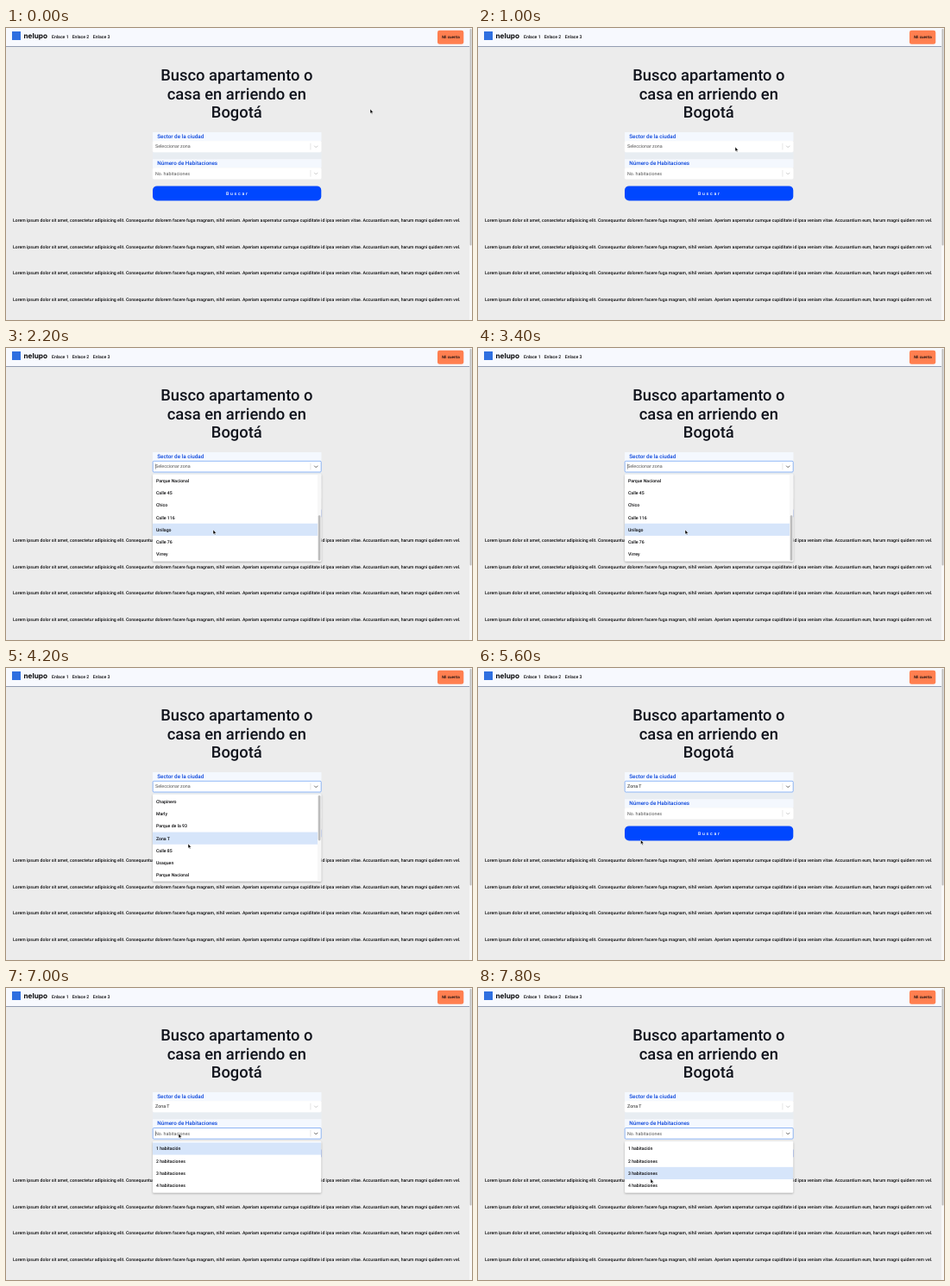
Animation of 540x339 px, one loop 8000 ms. Source, as an HTML page:

```html
<!DOCTYPE html>
<html lang="es">
<head>
<meta charset="utf-8">
<style>
  html, body { margin: 0; width: 100%; height: 100%; overflow: hidden; background: #ececec; }
  svg { display: block; width: 100vw; height: 100vh; }
  text { font-family: Roboto, "Open Sans", sans-serif; font-size: 5.17px; font-weight: 500; fill: #0a0a0c; text-rendering: geometricPrecision; }
  .brand { font: 700 8.2px Inter, sans-serif; }
  .title { font-size: 18.35px; fill: #10131c; text-anchor: middle; }
  .label { font-size: 6.32px; fill: #0b46dc; }
  .field { font-size: 5.35px; font-weight: 400; }
  .search { fill: #fff; letter-spacing: 1.75px; }
  .account { font-size: 4.6px; }
  .menu { filter: drop-shadow(0 1px 1.2px #0004); }
</style>
</head>
<body>
<svg id="stage" viewBox="0 0 540 339"></svg>
<script>
const LOOP = 8000, STEP = 200, ROW = 14.22, BLINK = 1060;
const stage = document.getElementById('stage');

function add(parent, tag, attrs = {}, content = '') {
  const node = document.createElementNS('http://www.w3.org/2000/svg', tag);
  for (const key in attrs) node.setAttribute(key, attrs[key]);
  node.textContent = content;
  return parent.appendChild(node);
}
const rect = (parent, x, y, width, height, fill, more) =>
  add(parent, 'rect', { x, y, width, height, fill, ...more });
const text = (parent, x, y, content, cls = '') => add(parent, 'text', { x, y, class: cls }, content);
const show = (node, on) => node.setAttribute('visibility', on ? 'inherit' : 'hidden');

function drawPage() {
  rect(stage, 0, 0, 540, 339, '#ececec');
  rect(stage, 0, 0, 537, 21, '#f7f9fe');
  rect(stage, 0, 21, 537, 1, '#939db2');
  rect(stage, 7, 4, 10, 10, '#2f6fe0');
  text(stage, 20.5, 12.2, 'nelupo', 'brand');
  [53, 76.7, 100.8].forEach((x, i) => text(stage, x, 12.3, `Enlace ${i + 1}`));
  rect(stage, 500, 2.8, 30.3, 16, '#ff7f50', { rx: 2.4 });
  text(stage, 505.3, 12.2, 'Mi cuenta', 'account');

  ['Busco apartamento o', 'casa en arriendo en', 'Bogotá'].forEach((line, i) =>
    text(stage, 267.3, 61.3 + 21.4 * i, line, 'title'));

  const lorem = 'Lorem ipsum dolor sit amet, consectetur adipisicing elit. Consequuntur dolorem facere fuga magnam, nihil veniam. ' +
    'Aperiam aspernatur cumque cupiditate id ipsa veniam vitae. Accusantium eum, harum magni quidem rem vel.';
  for (let i = 0; i < 4; i++) text(stage, 8, 225 + 30.55 * i, lorem);

  rect(stage, 170, 144, 195.5, 8, '#e8edf2');
  rect(stage, 170, 183.4, 195.3, 17, '#0047ff', { rx: 5 });
  text(stage, 255, 193.7, 'Buscar', 'search');

  rect(stage, 537, 0, 3, 339, '#f8f8f8');
  rect(stage, 537.5, 1, 2, 251.5, '#bdbdbd', { rx: 1 });
}

function makeSelect(top, label, placeholder) {
  rect(stage, 170, top, 195.5, 10, '#f4f8fe');
  text(stage, 175.2, top + 7.1, label, 'label');
  const y = top + 10;
  const box = rect(stage, 170.2, y + 0.3, 195, 12.7, '#fff', { rx: 1.2, 'stroke-width': 0.6 });
  const value = text(stage, 173, y + 8.3, placeholder, 'field');
  rect(stage, 352.7, y + 2.7, 0.5, 7.8, '#ccc');
  const chevron = add(stage, 'path', { d: `M357.2 ${y + 5.7}l2 2l2-2`, fill: 'none', 'stroke-width': 0.9 });
  const caret = rect(stage, 173, y + 3.5, 0.5, 6.2, '#555');
  return { set(focused, caretOn, chosen) {
    box.setAttribute('stroke', focused ? '#4a8cf5' : '#fff');
    chevron.setAttribute('stroke', focused ? '#555' : '#c4c4c4');
    value.textContent = chosen || placeholder;
    value.style.fill = chosen ? '#222' : '#555';
    caret.setAttribute('x', chosen ? 189.5 : 173);
    show(caret, focused && caretOn);
  } };
}

function makeMenu(top, height, options) {
  const scrolls = options.length * ROW > height;
  const width = scrolls ? 191 : 195.3, first = top + 1.4;
  const maxScroll = options.length * ROW + 2.8 - height;
  const id = `clip${top}`;
  rect(add(stage, 'clipPath', { id }), 170, top, 195.3, height);
  const group = add(stage, 'g', { class: 'menu' });
  rect(group, 170, top, 195.3, height, '#fff', { rx: 1.2 });
  const view = add(group, 'g', { 'clip-path': `url(#${id})` });
  const list = add(view, 'g');
  const hover = rect(list, 170, first, width, ROW, '#d6e5fa');
  options.forEach((name, i) => text(list, 174, first + ROW * i + 9, name));
  if (scrolls) rect(group, 361, top, 4.3, height, '#f7f7f7');
  const thumb = scrolls && rect(group, 361.8, first, 2.6, 52.5, '#bcbcbc', { rx: 1.3 });
  return { set(open, pointerY, amount = 0) {
    show(group, open);
    const scroll = amount * maxScroll;
    const row = Math.floor((pointerY + scroll - first) / ROW);
    hover.setAttribute('y', first + ROW * Math.max(0, Math.min(options.length - 1, row)));
    list.setAttribute('transform', `translate(0 ${-scroll})`);
    if (thumb) thumb.setAttribute('y', first + amount * (height - 55));
  } };
}

// Rows of [time, ...values], linear in between
const pointerPath = [
  [0, 422, 94], [200, 418, 95.5], [1000, 298, 138], [1400, 298, 138], [1800, 244, 205], [2200, 240, 211],
  [3600, 240, 211], [4000, 211, 204], [5000, 211, 204], [5800, 181, 198], [6200, 181, 198],
  [6800, 200, 169], [7200, 200, 169], [7800, 200, 221.5], [LOOP, 200, 221.5]
];
const scrollPath = [[0, 0], [1600, 0], [2200, 1], [3600, 1], [4000, 0], [LOOP, 0]];

function sample(path, t) {
  const i = path.findIndex((row, k) => k > 0 && t <= row[0]);
  const [a, b] = [path[i - 1], path[i]];
  const p = (t - a[0]) / (b[0] - a[0]);
  return a.slice(1).map((v, k) => v + (b[k + 1] - v) * p);
}

drawPage();
const zone = makeSelect(121, 'Sector de la ciudad', 'Seleccionar zona');
const rooms = makeSelect(152.2, 'Número de Habitaciones', 'No. habitaciones');
const zoneMenu = makeMenu(146.5, 101.3, ['Chapinero', 'Marly', 'Parque de la 93', 'Zona T', 'Calle 85', 'Usaquen',
  'Parque Nacional', 'Calle 45', 'Chico', 'Calle 116', 'Unilago', 'Calle 76', 'Virrey']);
const roomsMenu = makeMenu(178, 59.7, ['1 habitación', '2 habitaciones', '3 habitaciones', '4 habitaciones']);
const pointer = add(stage, 'path', {
  d: 'M0 0V5.3L1.2 4.2L2 6.1L2.9 5.7L2.1 3.9H3.7Z', fill: '#000', stroke: '#fff', 'stroke-width': 0.5
});

const OPEN = 1120, PICK = 4600, ROOMS = 7000;
const blink = (t, since) => (t - since) % BLINK < BLINK / 2;

function draw(time) {
  const t = Math.floor(time % LOOP / STEP) * STEP;
  const [x, y] = sample(pointerPath, t);
  const picked = t >= PICK;
  zone.set(t >= OPEN && t < ROOMS, blink(t, picked ? PICK : OPEN), picked ? 'Zona T' : '');
  rooms.set(t >= ROOMS, blink(t, ROOMS), '');
  zoneMenu.set(t >= OPEN && !picked, y, sample(scrollPath, t)[0]);
  roomsMenu.set(t >= ROOMS, y);
  pointer.setAttribute('transform', `translate(${x} ${y})`);
}

const start = performance.now();
(function tick() {
  draw(performance.now() - start);
  requestAnimationFrame(tick);
})();
</script>
</body>
</html>
```
